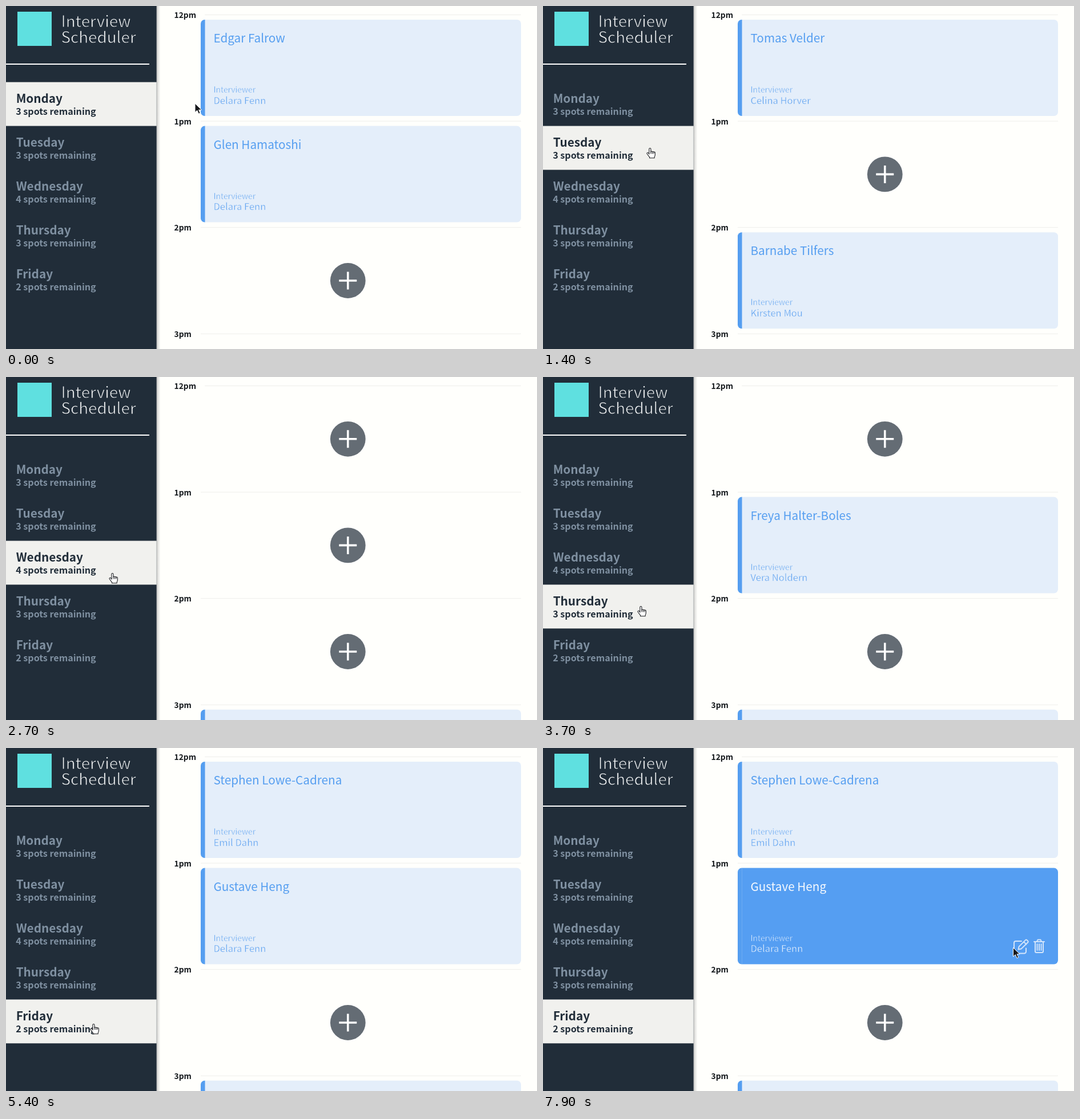
These frames come from a looping animation (930 by 602 pixels, 8000 ms). An HTML page:

```html
<!DOCTYPE html>
<html lang="en">
<head>
<meta charset="utf-8">
<title>Interview Scheduler</title>
<style>
html, body { margin: 0; width: 100%; height: 100%; overflow: hidden; background: #fffffc; }
svg { display: block; width: 930px; height: 602px; }
text {
  font-family: "Noto Sans CJK JP", "Noto Sans CJK SC", "Noto Sans CJK", "Noto Sans", sans-serif;
  white-space: pre;
}
/* An outline in the background colour thins the light text */
.title { font-size: 27.8px; font-weight: 300; fill: #f4f6f7; stroke: #212d39; stroke-width: .8; }
.hour { font-size: 13.8px; font-weight: 700; fill: #14181c; }
.day { font-size: 20.7px; font-weight: 700; }
.spots { font-size: 16.1px; font-weight: 700; }
.row { fill: #7f90a1; }
.row rect { fill: none; }
.row.hover, .row.on { fill: #212d39; }
.row.hover rect { fill: #e03f50; }
.row.on rect { fill: #f1f1ee; }
.edge { fill: #559ef0; }
.body { fill: #e4eefa; }
.name { font-size: 20.7px; fill: #559ef0; }
.label, .who { font-weight: 300; stroke: #e4eefa; stroke-width: .35; }
.label { font-size: 13.8px; fill: #6aa9f1; }
.who { font-size: 16.55px; fill: #62a4f1; }
.card.hover .body { fill: #559ef2; }
.card.hover .name { fill: #f7fafe; }
.card.hover .label, .card.hover .who { stroke: #559ef2; }
.card.hover .label { fill: #d8e8fc; }
.card.hover .who { fill: #e4effd; }
.icon { fill: none; stroke: #d3e5fb; stroke-width: 2; stroke-linejoin: round; stroke-linecap: round; visibility: hidden; }
.card.hover .icon { visibility: visible; }
.icon.lit { stroke: #fff; }
</style>
</head>
<body>
<svg viewBox="0 0 930 602">
  <defs>
    <linearGradient id="shade">
      <stop offset="0" stop-color="#000" stop-opacity=".25"/>
      <stop offset=".4" stop-color="#000" stop-opacity=".1"/>
      <stop offset="1" stop-color="#000" stop-opacity="0"/>
    </linearGradient>
  </defs>
  <rect width="930" height="602" fill="#fffffc"/>
  <g id="hours"></g>
  <g id="slots"></g>
  <rect x="263.7" width="7" height="602" fill="url(#shade)"/>
  <rect width="263.7" height="602" fill="#212d39"/>
  <rect x="20" y="10" width="60" height="60" fill="#5fe0e0"/>
  <text class="title" x="96.5" y="37">Interview</text>
  <text class="title" x="96.5" y="65">Scheduler</text>
  <rect y="101" width="251" height="2" fill="#fff"/>
  <g id="days"></g>
  <g id="cursor">
    <path id="arrow" d="M0 0V15.6l3.8-3.4 2.6 6 2.8-1.2-2.6-5.7h5z" fill="#17191c" stroke="#fff"/>
    <g id="hand" transform="translate(-.5 0) scale(.96)" stroke="#17191c" stroke-width="1.1" stroke-linejoin="round">
      <path fill="#fff" d="M-1.7 10.5V1a1.6 1.6 0 0 1 3.2 0v5.2a1.4 1.4 0 0 1 2.7 .3a1.4 1.4 0 0 1 2.6 .5a1.3 1.3 0 0 1 2.4 .8v3.7c0 2-.8 3-1.2 4.2v1.8h-9v-1.8c-1.6-1.6-3-3.6-4.6-6a1.5 1.5 0 0 1 2.3-1.8z"/>
      <path fill="none" d="M1.5 6v4M4.2 6.8V10M6.8 7.3V10"/>
    </g>
  </g>
</svg>
<script>
const LOOP = 8000, STEP = 100;
const ROW_TOP = 133.6, ROW_H = 76.95, SLOT_TOP = 24, SLOT_H = 186.6, CARD_H = 169;
const $ = id => document.getElementById(id);

// Each day: name, open spots, then the four visible slots
const week = [
  ['Monday', 3, ['Edgar Falrow', 'Delara Fenn'], ['Glen Hamatoshi', 'Delara Fenn'], null, null],
  ['Tuesday', 3, ['Tomas Velder', 'Celina Horver'], null, ['Barnabe Tilfers', 'Kirsten Mou'], null],
  ['Wednesday', 4, null, null, null, ['', '']],
  ['Thursday', 3, null, ['Freya Halter-Boles', 'Vera Noldern'], null, ['', '']],
  ['Friday', 2, ['Stephen Lowe-Cadrena', 'Emil Dahn'], ['Gustave Heng', 'Delara Fenn'], null, ['', '']]
];
const clicks = [0, 1400, 2700, 3700, 4700];

// Cursor moves: start, end, x, y reached
const moves = [
  [100, 200, 264.5, 174],
  [300, 1000, 188, 250],
  [1700, 2000, 187, 345],
  [2700, 3000, 172, 403],
  [4100, 4200, 159, 451],
  [4300, 4400, 150, 486],
  [5300, 5400, 154, 485],
  [6000, 6700, 882, 358],
  [6800, 7400, 838, 347],
  [7500, 7900, 823.5, 350.5]
];

const text = (cls, x, y, s) => `<text class="${cls}" x="${x}" y="${y}">${s}</text>`;

const plus = y => `<g transform="translate(598.8 ${y + 84.8})">
  <circle r="30.9" fill="#646c74"/>
  <path d="M-15.5 0h31M0-15.5v31" stroke="#fff" stroke-width="3.6"/></g>`;

const icons = `
  <path class="icon" d="M497 128.3h-10a3 3 0 0 0-3 3v15.5a3 3 0 0 0 3 3h15a3 3 0 0 0 3-3v-6
    M491.5 143l1-5 11.5-11.5a1.8 1.8 0 0 1 2.6 0l1.6 1.6a1.8 1.8 0 0 1 0 2.6l-11.7 11.3zM501 129.5l4.5 4.5"/>
  <path class="icon" d="M519 129.5h18M524 129l1.5-3h5l1.5 3M521 130v16.5a2 2 0 0 0 2 2h10a2 2 0 0 0 2-2v-16.5
    M524.5 133.5v11M528 133.5v11M531.5 133.5v11"/>`;

const card = (y, [name, who]) => `<g class="card" data-y="${y}" transform="translate(341 ${y})">
  <path class="edge" d="M7.8 0h-.8a7 7 0 0 0-7 7v155a7 7 0 0 0 7 7h.8z"/>
  <path class="body" d="M7.7 0h546.3a7 7 0 0 1 7 7v155a7 7 0 0 1-7 7h-546.3z"/>
  ${text('name', 22.5, 40, name)}${text('label', 22.5, 128.3, 'Interviewer')}${text('who', 22.5, 147.5, who)}
  ${icons}</g>`;

$('hours').innerHTML = ['12pm', '1pm', '2pm', '3pm'].map((h, i) => {
  const y = SLOT_H * i, x = i ? 341 : 348;
  return text('hour', 294.5, 21 + y, h) +
    `<rect x="${x}" y="${15 + y}" width="${902 - x}" height="1" fill="#eeeeeb"/>`;
}).join('');

$('days').innerHTML = week.map(([day, n], i) => {
  const y = ROW_TOP + ROW_H * i;
  return `<g class="row"><rect y="${y}" width="263.7" height="${ROW_H}"/>` +
    text('day', 17.7, y + 36.7, day) + text('spots', 17.2, y + 57.3, n + ' spots remaining') + '</g>';
}).join('');
const rows = [...document.querySelectorAll('.row')];

function cursorAt(t) {
  let x = 331, y = 171;
  for (const [from, to, nx, ny] of moves) {
    if (t <= from) break;
    const p = Math.min(1, (t - from) / (to - from));
    const e = p * p * (3 - 2 * p);
    x += (nx - x) * e;
    y += (ny - y) * e;
  }
  return [x, y];
}

let shown = -1;
function showDay(day) {
  if (day === shown) return;
  shown = day;
  $('slots').innerHTML = week[day].slice(2).map((slot, i) => {
    const y = SLOT_TOP + SLOT_H * i;
    return slot ? card(y, slot) : plus(y);
  }).join('');
}

function draw(t) {
  const day = clicks.filter(c => c <= t).length - 1;
  const [x, y] = cursorAt(t);
  showDay(day);

  const over = x < 264 ? Math.floor((y - ROW_TOP) / ROW_H) : -1;
  rows.forEach((row, i) => {
    row.classList.toggle('on', i === day);
    row.classList.toggle('hover', i === over && i !== day);
  });

  let link = over >= 0 && over < week.length;
  document.querySelectorAll('.card').forEach(c => {
    const dy = y - c.dataset.y;
    const inside = x >= 341 && x < 902 && dy >= 0 && dy < CARD_H;
    c.classList.toggle('hover', inside);
    c.querySelectorAll('.icon').forEach((icon, i) => {
      const left = i ? 859 : 825, right = i ? 880 : 851;
      const lit = inside && x >= left && x < right && dy > 124 && dy < 151;
      icon.classList.toggle('lit', lit);
      link = link || lit;
    });
  });

  $('cursor').setAttribute('transform', `translate(${x.toFixed(1)} ${y.toFixed(1)})`);
  $('hand').style.display = link ? '' : 'none';
  $('arrow').style.display = link ? 'none' : '';
}

// The screen refreshes in tenths of a second; a small lead absorbs rounding
const start = performance.now();
function tick() {
  const t = (performance.now() - start + 20) % LOOP;
  draw(Math.floor(t / STEP) * STEP);
  requestAnimationFrame(tick);
}
tick();
</script>
</body>
</html>
```
